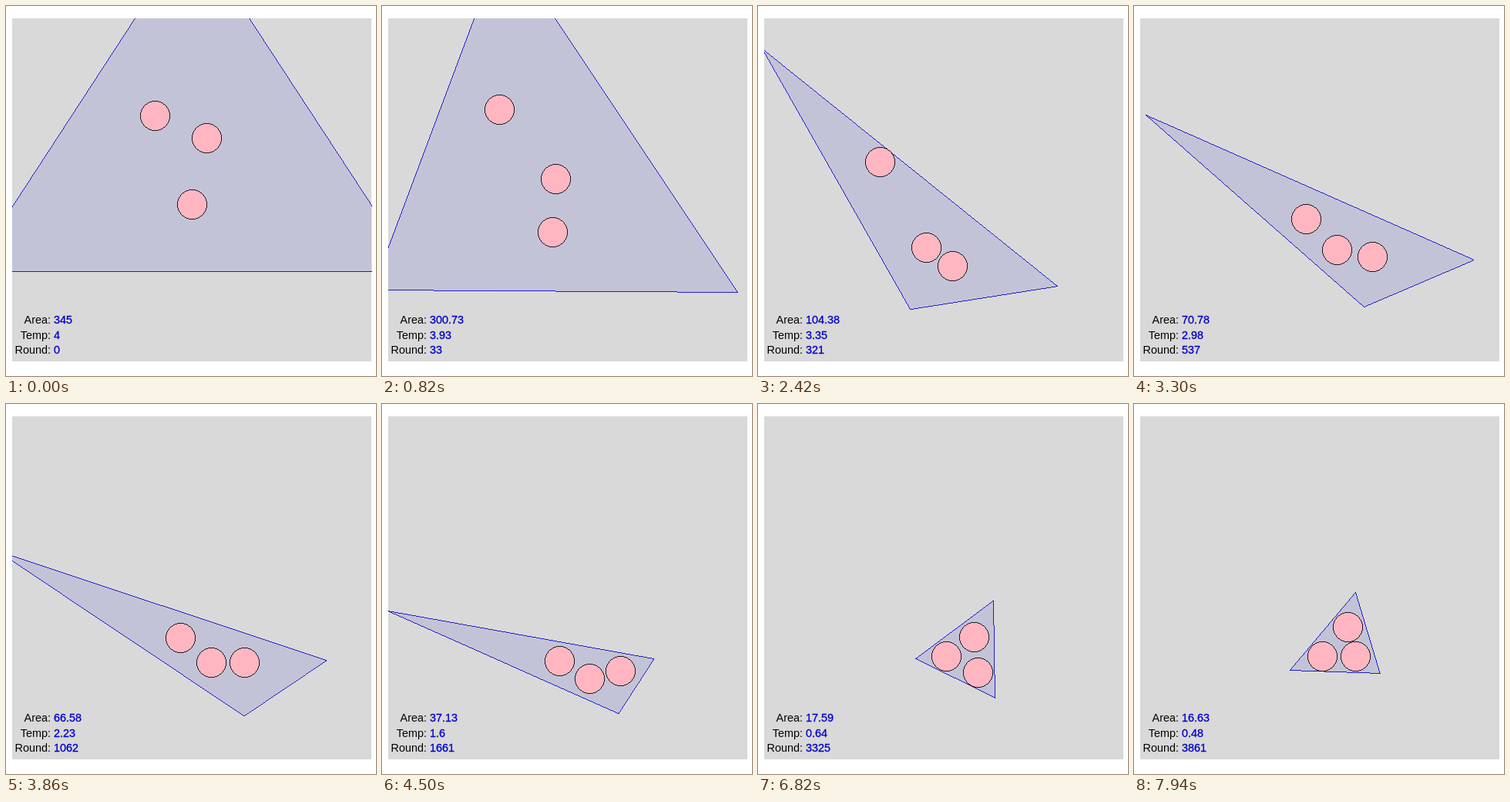
Write an HTML page that moves like this. It is 480 by 480 pixels and loops after 8 s.

```html
<!DOCTYPE html>
<html lang="en">
<head>
<meta charset="utf-8">
<title>Smallest triangle by annealing</title>
<style>
  html, body { margin: 0; width: 100%; height: 100%; overflow: hidden; background: #fff; }
  svg { display: block; width: 100%; height: 100%; }
  .shapes { shape-rendering: crispEdges; stroke-width: .85; }
  polygon { fill: rgba(0, 0, 205, .1); stroke: #0000cd; }
  circle { fill: #ffb6c1; stroke: #000; }
  text { font: 14.4px "Liberation Sans", Arial, sans-serif; }
  .label { text-anchor: end; }
  .value { fill: #0000cd; stroke: #0000cd; stroke-width: .3; }
</style>
</head>
<body>
<svg viewBox="0 0 480 480">
  <clipPath id="panel"><rect x="8" y="16" width="467" height="445"/></clipPath>
  <rect x="8" y="16" width="466" height="445" fill="#d9d9d9"/>
  <g class="shapes" clip-path="url(#panel)">
    <g transform="translate(.5 .5)">
      <polygon/>
      <circle r="19"/><circle r="19"/><circle r="19"/>
    </g>
  </g>
  <text class="label" x="58" y="412">Area:</text><text class="value" x="62" y="412"></text>
  <text class="label" x="58" y="432">Temp:</text><text class="value" x="62" y="432"></text>
  <text class="label" x="58" y="451">Round:</text><text class="value" x="62" y="451"></text>
</svg>
<script>
const LOOP = 8000, FIRST_HOLD = 500, STEP = 80;
const RADIUS = 19, SLACK = 0.1, COOLING = 0.00055;

// Key poses; corners run clockwise.
const poses = [
  { step: 0, round: 0, area: 345, corners: [[-47, 344], [241, -98], [530, 344]], discs: [[193, 142], [260, 171], [241, 257]] },
  { step: 13, round: 85, area: 101.9, corners: [[88, 373], [32, 3], [293, 381]], discs: [[87, 122], [168, 310], [190, 350]] },
  { step: 36, round: 537, area: 70.78, corners: [[297, 390], [14, 141], [440, 329]], discs: [[223, 276], [263, 316], [309, 325]] },
  { step: 51, round: 1661, area: 37.13, corners: [[306, 401], [7, 268], [352, 330]], discs: [[230, 333], [269, 356], [309, 346]] },
  { step: 62, round: 2165, area: 31.21, corners: [[280, 388], [110, 282], [400, 326]], discs: [[206, 318], [258, 346], [324, 337]] },
  { step: 80, round: 3325, area: 17.59, corners: [[307, 381], [203, 330], [305, 254]], discs: [[244, 327], [285, 348], [280, 302]] },
  { step: 94, round: 3861, area: 16.63, corners: [[319, 349], [201, 345], [287, 243]], discs: [[244, 327], [287, 327], [277, 289]] }
];

const polygon = document.querySelector("polygon");
const circles = document.querySelectorAll("circle");
const values = document.querySelectorAll(".value");

const mix = (a, b, p) => Array.isArray(a) ? a.map((v, i) => mix(v, b[i], p)) : a + (b - a) * p;
const short = number => String(+number.toFixed(2));

// Distance of a point from the side a-b, positive inside the triangle.
function depth([x, y], [ax, ay], [bx, by]) {
  return ((bx - ax) * (y - ay) - (by - ay) * (x - ax)) / Math.hypot(bx - ax, by - ay);
}

// Smallest growth about the centre that keeps every disc inside.
function enclosingScale(corners, discs, centre) {
  return Math.max(...corners.flatMap((a, i) => {
    const b = corners[(i + 1) % 3];
    const inner = depth(centre, a, b);
    return discs.map(disc => 1 + (RADIUS - depth(disc, a, b)) / inner);
  }));
}

function draw(time) {
  const t = time % LOOP;
  const step = t < FIRST_HOLD ? 0 : 1 + Math.floor((t - FIRST_HOLD) / STEP);
  const next = Math.max(1, poses.findIndex(pose => pose.step >= step));
  const from = poses[next - 1], to = poses[next];
  const p = (step - from.step) / (to.step - from.step);

  const discs = mix(from.discs, to.discs, p);
  const corners = mix(from.corners, to.corners, p);
  const centre = [0, 1].map(axis => corners.reduce((sum, c) => sum + c[axis] / 3, 0));
  const slack = 1 + SLACK * Math.sin(Math.PI * p);
  const scale = Math.max(slack, enclosingScale(corners, discs, centre));

  const grown = corners.map(corner => mix(centre, corner, scale).map(Math.round));
  polygon.setAttribute("points", grown.join(" "));
  circles.forEach((circle, i) => {
    circle.setAttribute("cx", Math.round(discs[i][0]));
    circle.setAttribute("cy", Math.round(discs[i][1]));
  });

  const round = Math.round(mix(from.round, to.round, p));
  const area = mix(from.area, to.area, p) * scale ** 2;
  const temperature = 4 * Math.exp(-COOLING * round);
  [area, temperature, round].forEach((v, i) => values[i].textContent = short(v));
}

const start = performance.now();
function tick() {
  draw(performance.now() - start);
  requestAnimationFrame(tick);
}
tick();
</script>
</body>
</html>
```
